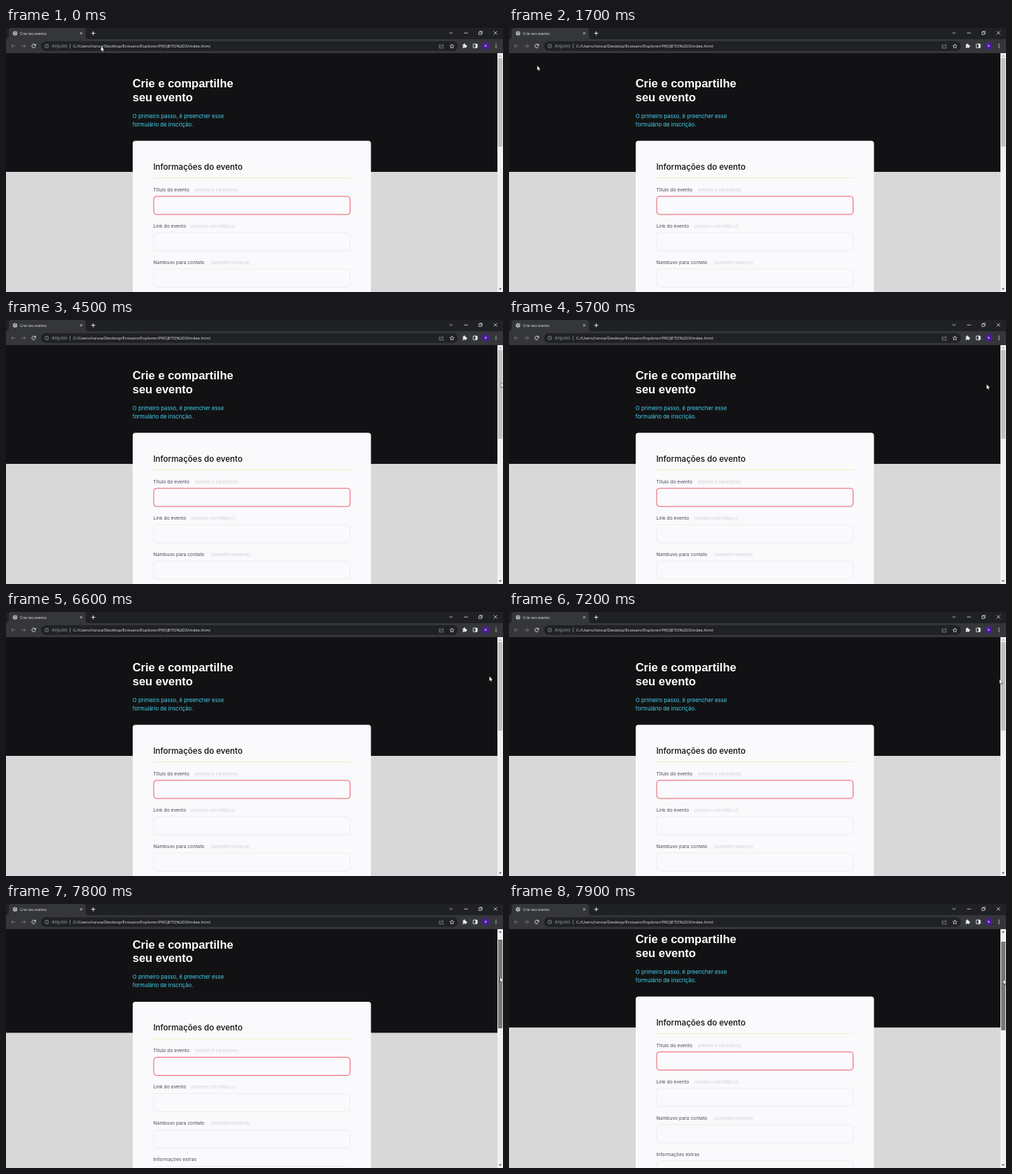
An HTML page with a canvas that plays this animation: 710x378 px, repeating every 8 s.

```html
<!DOCTYPE html>
<html lang="pt">
<head>
<meta charset="utf-8">
<title>Crie seu evento</title>
<style>
html, body { margin: 0; width: 100%; height: 100%; overflow: hidden; background: #121214; }
canvas { display: block; width: 710px; height: 378px; }
</style>
</head>
<body>
<canvas id="stage"></canvas>
<script>
const W = 710, H = 378, LOOP = 8000;
const UI = '"Open Sans", "Noto Sans", sans-serif';
const BODY = 'Inter, Roboto, sans-serif';
const HEAD = '"Liberation Sans", Arial, sans-serif';

// start time, pointer x, pointer y, scroll offset, thumb colour
const REST = '#c1c1c1', HOVER = '#a8a8a8', DOWN = '#787878';
const STEPS = [
  [0, 135.8, 26.6, 0, REST],
  [1600, 88, 42, 0, REST],
  [1700, 40.4, 54, 0, REST],
  [3000, 708.2, 89.6, 0, REST],
  [4500, 707.4, 89.8, 0, REST],
  [5500, 707.6, 99.8, 0, REST],
  [5700, 682.4, 92.3, 0, REST],
  [6600, 690.6, 92.3, 0, REST],
  [7100, 696, 95, 0, REST],
  [7200, 700.8, 96.4, 0, REST],
  [7500, 706, 96.2, 0, HOVER],
  [7600, 706, 96.2, 0, DOWN],
  [7800, 706, 105, 21.6, DOWN],
  [7900, 706.3, 108.2, 29.2, DOWN]
];
const THUMB_RATIO = 127 / 342;

const canvas = document.getElementById('stage');
const dpr = window.devicePixelRatio || 1;
canvas.width = W * dpr;
canvas.height = H * dpr;
const c = canvas.getContext('2d');
c.scale(dpr, dpr);

function box(x, y, w, h, fill) {
  c.fillStyle = fill;
  c.fillRect(x, y, w, h);
}

function round(x, y, w, h, r, fill, line, lw = 1) {
  c.beginPath();
  c.roundRect(x, y, w, h, r);
  if (fill) { c.fillStyle = fill; c.fill(); }
  if (line) { c.strokeStyle = line; c.lineWidth = lw; c.stroke(); }
}

function dot(x, y, r, fill) {
  c.beginPath();
  c.arc(x, y, r, 0, Math.PI * 2);
  c.fillStyle = fill;
  c.fill();
}

function ring(x, y, r, color, lw, from = 0, to = Math.PI * 2) {
  c.beginPath();
  c.arc(x, y, r, from, to);
  c.strokeStyle = color;
  c.lineWidth = lw;
  c.stroke();
}

function path(d, color, lw, x = 0, y = 0) {
  c.save();
  c.translate(x, y);
  c.strokeStyle = color;
  c.lineWidth = lw;
  c.stroke(new Path2D(d));
  c.restore();
}

function shape(d, fill, x = 0, y = 0) {
  c.save();
  c.translate(x, y);
  c.fillStyle = fill;
  c.fill(new Path2D(d));
  c.restore();
}

function text(str, x, y, size, color, family, weight = 400) {
  c.font = `${weight} ${size}px ${family}`;
  c.fillStyle = color;
  c.fillText(str, x, y);
}

function field(label, y, hint, hintX, line, tall = 26) {
  text(label, 210.5, y, 6.75, '#49495a', BODY);
  if (hint) text(hint, hintX, y, 6.05, '#cdcdd5', BODY);
  round(211, y + 7, 280.6, tall, 4, '#fafafc', line, line === '#e9e9ef' ? 0.8 : 1);
}

function drawPage(scroll) {
  c.save();
  c.beginPath();
  c.rect(0, 36, 702, H - 36);
  c.clip();
  c.translate(0, -scroll);
  box(0, 36, 702, 170, '#121214');
  box(0, 206, 702, 400, '#d8d8d9');

  text('Crie e compartilhe', 180.7, 85.3, 16.5, '#fff', HEAD, 700);
  text('seu evento', 180.7, 104.8, 16.5, '#fff', HEAD, 700);
  text('O primeiro passo, é preencher esse', 180.8, 128.8, 7.74, '#46d6f2', BODY);
  text('formulário de inscrição.', 180.8, 140.8, 7.74, '#46d6f2', BODY);

  round(181, 161.6, 340.4, 420, 4, '#fafafc');
  text('Informações do evento', 210.4, 203, 11.6, '#0b0b0d', BODY, 500);
  box(210.6, 214.2, 281.2, 0.8, '#f0edb0');

  field('Título do evento', 234, '(mínimo 6 caracteres)', 269.3, '#f0566a');
  field('Link do evento', 286, '(comece com https://)', 264, '#e9e9ef');
  field('Nambuvo para contato', 338, '(somente números)', 292.8, '#e9e9ef');
  field('Informações extras', 390, '', 0, '#e9e9ef', 70);
  c.restore();
}

function drawScrollbar(scroll, color) {
  box(702, 36, 8, H - 36, '#f1f1f1');
  box(703, 43 + scroll * THUMB_RATIO, 6.2, 127, color);
  shape('M-2 1 L0 -1.2 L2 1 Z', scroll ? '#505050' : '#a3a3a3', 706, 40);
  shape('M-2 -1 L0 1.2 L2 -1 Z', '#505050', 706, 373.8);
}

function drawTabs() {
  const ink = '#e8eaed';
  box(0, 0, W, 16, '#202124');
  shape('M0 16 Q4 16 4 12 V4 Q4 0 8 0 H110 Q114 0 114 4 V12 Q114 16 118 16 Z', '#35363a');
  dot(13, 7.6, 3.2, '#c8cbd0');
  path('M-2.4 -1 Q-.5 -.6 -.4 .4 T.6 2.4 M.2 -2.6 Q0 -1 1.4 -.8 T2.6 .6', '#35363a', 0.9, 13, 7.6);
  text('Crie seu evento', 20, 9.7, 5.3, ink, UI);
  path('M-1.6 -1.6 L1.6 1.6 M1.6 -1.6 L-1.6 1.6', ink, 0.8, 107.4, 7.6);
  path('M-2.8 0 H2.8 M0 -2.8 V2.8', ink, 1, 124.6, 7.6);
  path('M-2.4 -1.2 L0 1.2 L2.4 -1.2', ink, 0.8, 635.6, 7);
  path('M-2.6 0 H2.6', ink, 0.8, 657, 7.2);
  path('M-2.3 -1.2 H1.2 V2.4 H-2.3 Z M-1 -1.2 V-2.4 H2.5 V1.2 H1.2', ink, 0.7, 677.8, 7);
  path('M-2.4 -2.4 L2.4 2.4 M2.4 -2.4 L-2.4 2.4', ink, 0.8, 699.2, 7);
}

function drawToolbar() {
  const ink = '#e8eaed', soft = '#9aa0a6', off = '#77797d';
  box(0, 16, W, 20, '#35363a');
  const arrow = 'M3 0 H-2.8 M0 -2.9 L-2.9 0 L0 2.9';
  path(arrow, off, 0.9, 10.4, 25.7);
  path('M-3 0 H2.8 M0 -2.9 L2.9 0 L0 2.9', off, 0.9, 25.2, 25.7);
  ring(39.6, 25.7, 2.6, ink, 0.95, 0.5, 5.5);
  shape('M.4 -.3 H3.2 V-3.1 Z', ink, 39.6, 25.7);

  round(50, 19, 595.5, 13.8, 6.9, '#202124');
  ring(58.2, 25.8, 2.7, soft, 0.7);
  box(57.85, 25.3, 0.7, 2, soft);
  box(57.85, 24, 0.7, 0.7, soft);
  text('Arquivo', 65.5, 28.1, 6.2, soft, UI);
  box(91.2, 22.4, 0.7, 7, soft);
  text('C:/Users/tonva/Desktop/Enovaro/Explorer/PROJETO%203/index.html', 96, 28.1, 6.13, ink, UI);

  path('M-1.4 -1.8 H-3 V2.8 H2.8 V1 M-1.4 1 Q-1 -1.4 2 -1.4 M1 -3.2 L3 -1.4 L1 .4', soft, 0.7, 622, 26);
  path('M0 -3 L.9 -.9 L3.1 -.7 L1.4 .7 L1.9 2.9 L0 1.7 L-1.9 2.9 L-1.4 .7 L-3.1 -.7 L-.9 -.9 Z', ink, 0.7, 637, 25.9);

  round(652.3, 23.7, 5, 5, 0.7, ink);
  dot(654.8, 23.4, 1.1, ink);
  dot(657.6, 26.2, 1.1, ink);
  dot(652.4, 26.3, 0.9, '#35363a');
  dot(654.8, 28.7, 0.9, '#35363a');

  round(667.4, 22.9, 5.8, 5.4, 0.5, null, ink, 0.9);
  box(670.6, 22.9, 2.6, 5.4, ink);

  dot(685.2, 25.7, 5.1, '#4c1a9c');
  c.textAlign = 'center';
  text('e', 685.2, 27.3, 5.4, '#fff', UI);
  c.textAlign = 'left';
  for (const y of [23.3, 25.7, 28.1]) dot(700, y, 0.75, ink);
}

function drawPointer(x, y) {
  const d = 'M0 0 V6.4 L1.5 5.1 L2.5 7.4 L3.5 7 L2.5 4.7 H4.5 Z';
  path(d, '#000', 0.9, x, y);
  shape(d, '#fff', x, y);
}

function draw(time) {
  const [, x, y, scroll, color] = STEPS.findLast(s => s[0] <= time);
  drawPage(scroll);
  drawScrollbar(scroll, color);
  drawTabs();
  drawToolbar();
  drawPointer(x, y);
}

const start = performance.now();
function tick() {
  draw((performance.now() - start) % LOOP);
  requestAnimationFrame(tick);
}
tick();
</script>
</body>
</html>
```
